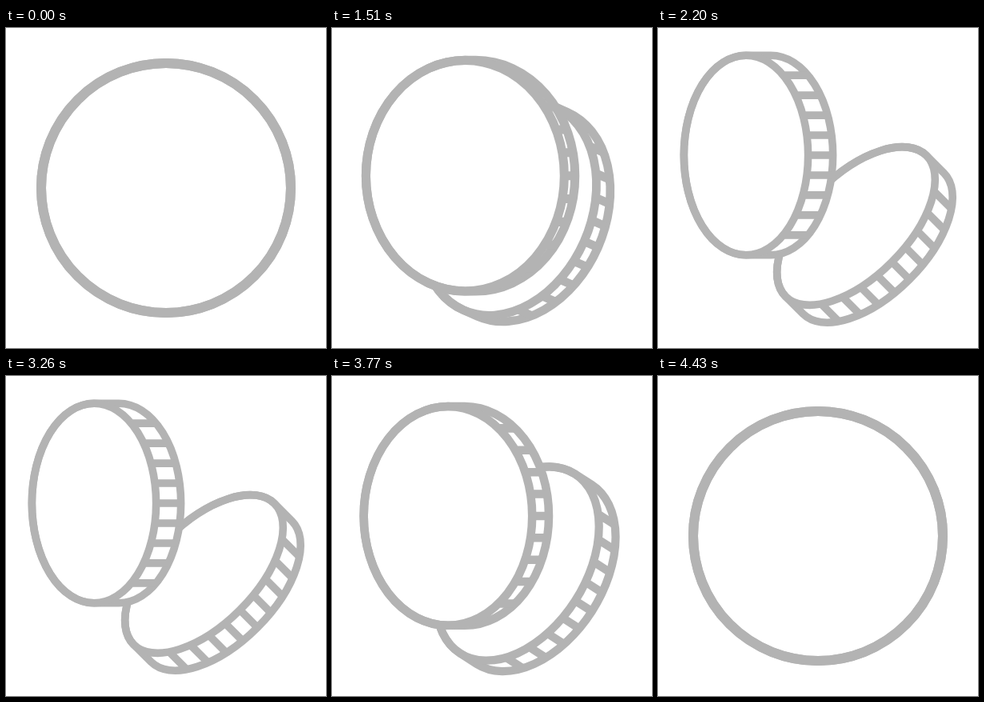
Recreate the animation shown at these times as an HTML page with a canvas. Size 400 by 400 pixels, loop 4460 ms.

```html
<!DOCTYPE html>
<html lang="en">
<head>
<meta charset="utf-8">
<title>Coins</title>
<style>
html, body { margin: 0; height: 100%; overflow: hidden; background: #fff; }
canvas { display: block; width: 400px; height: 400px; }
</style>
</head>
<body>
<canvas id="stage"></canvas>
<script>
const LOOP = 4460, STEP = 30, MOVE = 1180, OPEN_AT = 1000, CLOSE_AT = 3240;
const canvas = document.getElementById('stage');
const ctx = canvas.getContext('2d');
const density = window.devicePixelRatio || 1;
canvas.width = canvas.height = 400 * density;

const mix = (a, b, k) => a + (b - a) * k;
const ease = u => u < .5 ? 2 * u * u : 1 - 2 * (1 - u) * (1 - u);
const progress = (time, start) => ease(Math.min(1, Math.max(0, (time - start) / MOVE)));

// ry: long radius of the face; ratio: its width to height; edge: visible thickness
function coin(x, y, ry, ratio, angle, edge, line) {
  const quarter = Math.PI / 2, rx = ry * ratio;
  ctx.save();
  ctx.translate(x, y);
  ctx.rotate(angle);
  ctx.lineWidth = line;

  ctx.beginPath();
  ctx.ellipse(0, 0, rx, ry, 0, quarter, 3 * quarter);
  ctx.ellipse(edge, 0, rx, ry, 0, -quarter, quarter);
  ctx.closePath();
  ctx.fill();
  ctx.stroke();

  ctx.beginPath();
  ctx.ellipse(0, 0, rx, ry, 0, 0, 4 * quarter);
  if (edge > 0) {
    for (let i = -4; i <= 4; i++) {
      const v = i / 5, left = rx * Math.sqrt(1 - v * v);
      ctx.moveTo(left, v * ry);
      ctx.lineTo(left + edge, v * ry);
    }
  }
  ctx.stroke();
  ctx.restore();
}

// open: 0 is a single ring, 1 is two separate coins
function draw(open) {
  const scale = mix(1.25, 1, open);
  ctx.setTransform(density, 0, 0, density, 0, 0);
  ctx.fillStyle = '#fff';
  ctx.strokeStyle = '#b3b3b3';
  ctx.fillRect(0, 0, 400, 400);

  if (open > 0) {
    const k = open ** .65; // the rear coin runs ahead of the front one
    coin(200 + 47.5 * open * scale, mix(200, 247.5, k), mix(156, 124.5, k),
      mix(1, .51, k), k * Math.PI / 4, 31 * k * scale, mix(12, 9.6, k));
  }
  coin(mix(200, 110, open), mix(200, 159, open), 124.8 * scale,
    mix(1, .622, open), 0, 31 * open * scale, 9.6 * scale);
}

function frame(now) {
  const time = Math.floor((now % LOOP - 10) / STEP) * STEP + 10;
  draw(progress(time, OPEN_AT) - progress(time, CLOSE_AT));
  requestAnimationFrame(frame);
}
requestAnimationFrame(frame);
</script>
</body>
</html>
```
